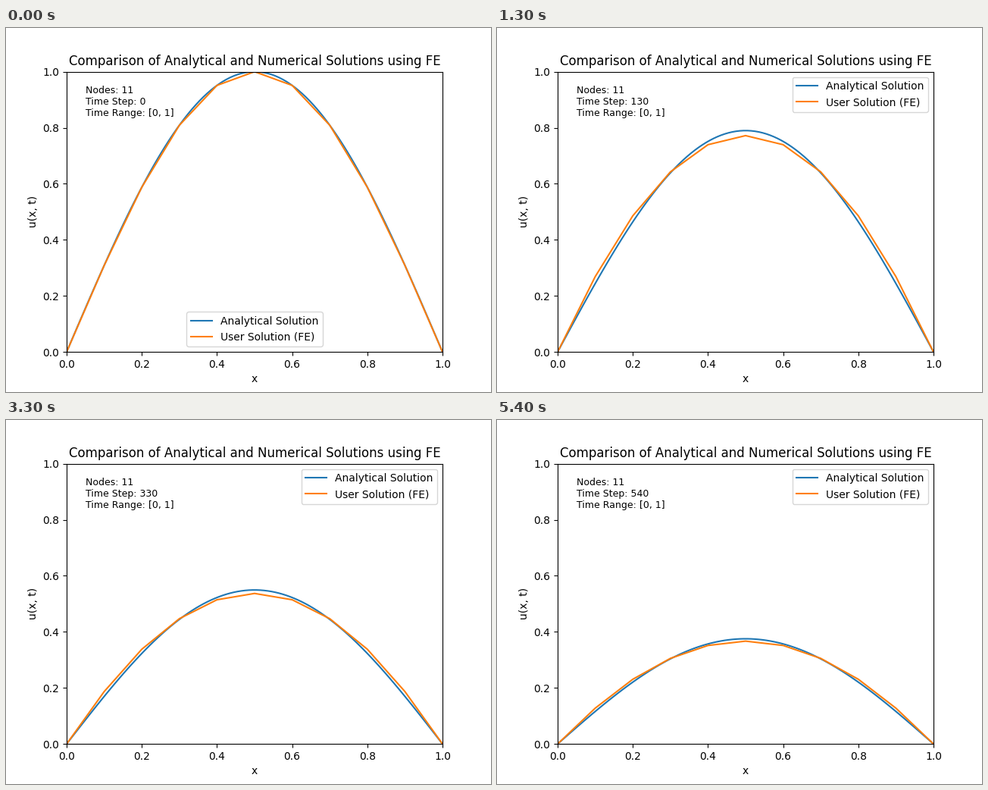
Animation, 640 px wide and 480 px high, one loop 5.5 s. Source, as a matplotlib script:

```python
import numpy as np
import matplotlib.pyplot as plt
from matplotlib.animation import FuncAnimation

FRAMES = 55
INTERVAL = 100
STEPS_PER_FRAME = 10
DT = 1 / 551
NODES = 11

# Sine modes of the element solution: settled amplitude and decay rate
MODES = np.array([1, 3, 5, 7])
SETTLED = np.array([1.0018, 0.0291, 0.0062, 0.0014])
START = np.array([1.0, 0.0, 0.0, 0.0])
COS = np.cos(MODES * np.pi / (NODES - 1))
RATES = 6 * (NODES - 1) ** 2 * (1 - COS) / (2 + COS)

x_fine = np.linspace(0, 1, 100)
x_nodes = np.linspace(0, 1, NODES)
SHAPES = np.sin(np.pi * np.outer(MODES, x_nodes))


def analytical(t):
    return np.exp(-t) * np.sin(np.pi * x_fine)


def element_solution(t):
    amps = SETTLED * np.exp(-t) + (START - SETTLED) * np.exp(-RATES * t)
    return amps @ SHAPES


def info(step):
    return f"Nodes: {NODES}\nTime Step: {step}\nTime Range: [0, 1]"


fig, ax = plt.subplots(figsize=(6.4, 4.8), dpi=100)
exact_line, = ax.plot(x_fine, analytical(0), label="Analytical Solution")
user_line, = ax.plot(x_nodes, element_solution(0), label="User Solution (FE)")
ax.set_xlim(0, 1)
ax.set_ylim(0, 1)
ax.set_xlabel("x")
ax.set_ylabel("u(x, t)")
ax.set_title("Comparison of Analytical and Numerical Solutions using FE")
label = ax.text(0.05, 0.95, info(0), transform=ax.transAxes,
                fontsize=9, va="top")
# "best" lets the legend jump to the corner once the curves clear it
ax.legend(loc="best")


def update(frame):
    step = frame * STEPS_PER_FRAME
    t = step * DT
    exact_line.set_ydata(analytical(t))
    user_line.set_ydata(element_solution(t))
    label.set_text(info(step))
    return exact_line, user_line, label


anim = FuncAnimation(fig, update, frames=FRAMES, interval=INTERVAL,
                     repeat=True, repeat_delay=0, blit=False)
plt.show()
```
